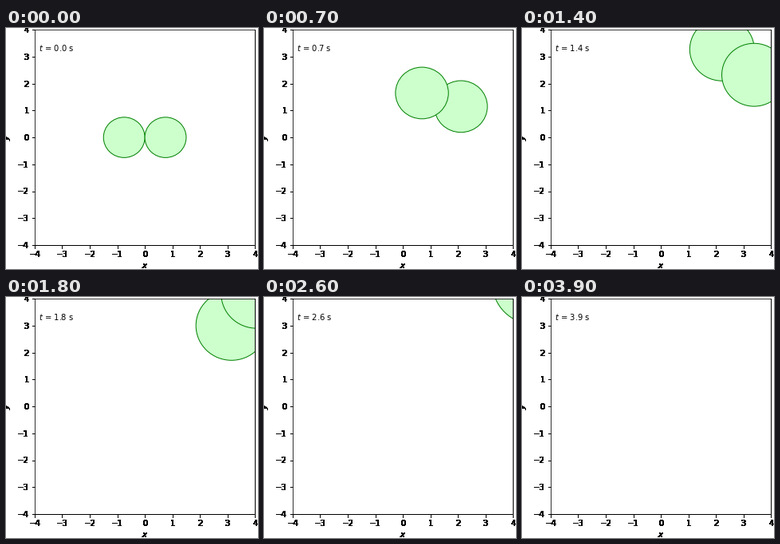
A matplotlib script that plays this animation: 316 by 302 pixels, repeating every 4000 ms.

```python
import numpy as np
import matplotlib.pyplot as plt
from matplotlib.animation import FuncAnimation
from matplotlib.patches import Circle

W, H, DPI = 316, 302, 72
LEFT, RIGHT, TOP, BOTTOM = 35.8, 312.4, 2.3, 271.9  # plot area in pixels
FRAMES, STEP = 40, 0.1

ORBIT = 0.75    # distance of each disc from the shared centre
SPIN = 4.0      # rad/s
DRIFT = 2.0     # speed of the centre along x and y
GROWTH = 0.3    # radius gained per second


def harden(img, dpi):
    """Turn every touched pixel solid black, without antialiasing."""
    out = np.zeros_like(img)
    out[..., 3] = img[..., 3] > 0
    return out, 0, 0


fig = plt.figure(figsize=(W / DPI, H / DPI), dpi=DPI, facecolor="white")
ax = fig.add_axes([LEFT / W, 1 - BOTTOM / H,
                   (RIGHT - LEFT) / W, (BOTTOM - TOP) / H])
ax.set(xlim=(-4, 4), ylim=(-4, 4))
ax.set_xticks(range(-4, 5))
ax.set_yticks(range(-4, 5))
ax.set_xlabel("$x$")
ax.set_ylabel("$y$", labelpad=6.5)
for part in (ax.xaxis, ax.yaxis, ax.spines["right"], ax.spines["bottom"]):
    part.set_agg_filter(harden)

discs = [ax.add_patch(Circle((0, 0), ORBIT, fc="#ccffcc", ec="g", lw=1))
         for _ in range(2)]
clock = ax.text(0.02, 0.9, "", transform=ax.transAxes)


def update(i):
    t = i * STEP
    arm = ORBIT * np.array([np.cos(SPIN * t), np.sin(SPIN * t)])
    for disc, side in zip(discs, (-1, 1)):
        disc.center = tuple(DRIFT * t + side * arm)
        disc.radius = ORBIT + GROWTH * t
    clock.set_text(f"$t$ = {t:.1f} s")
    return [*discs, clock]


anim = FuncAnimation(fig, update, frames=FRAMES, interval=1000 * STEP,
                     repeat=True, repeat_delay=0)
plt.show()
```
